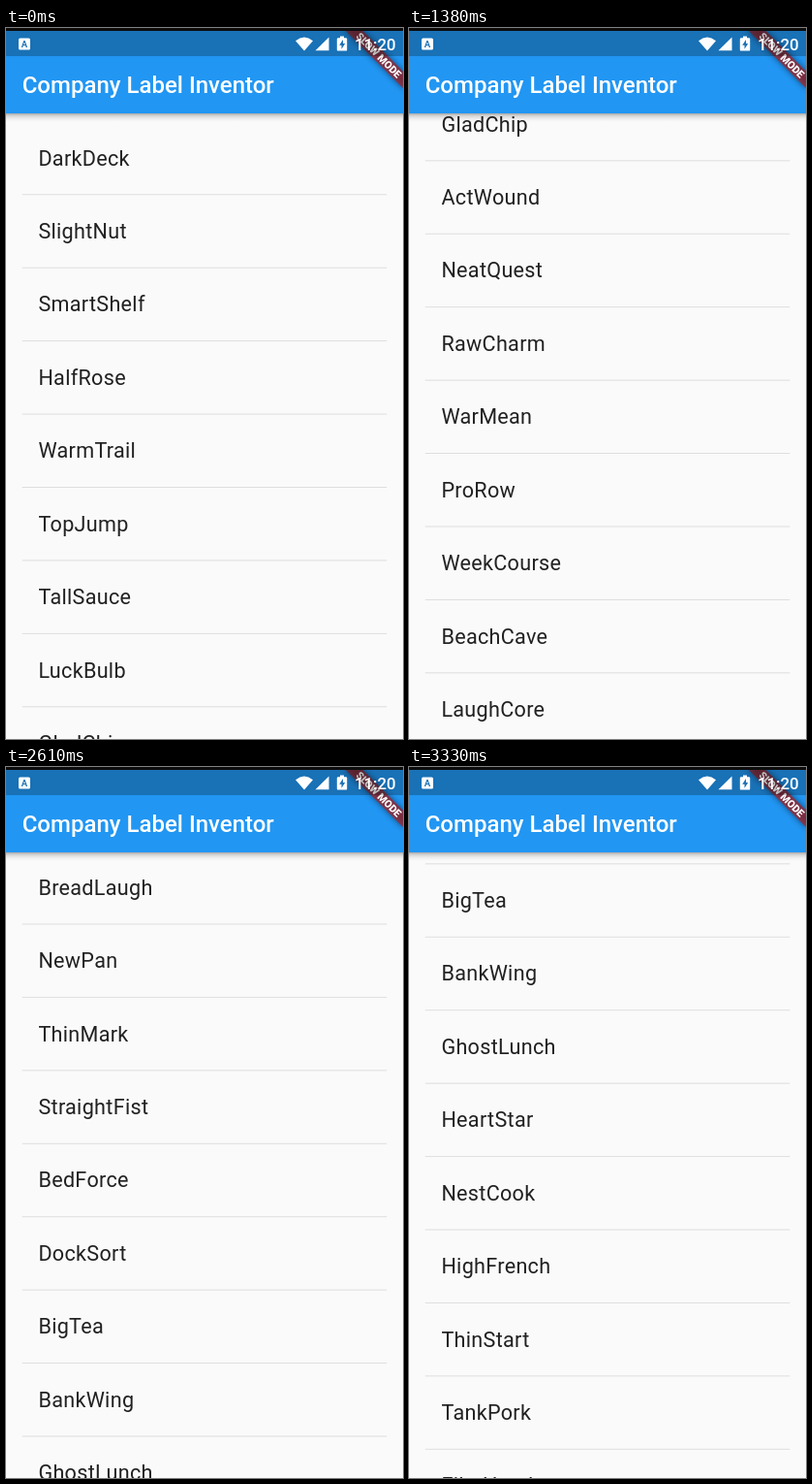
An HTML page for the animation above (4290 ms loop, 410x733 px).

```html
<!DOCTYPE html>
<html lang="en">
<head>
<meta charset="utf-8">
<title>Name list</title>
<style>
  html, body { margin: 0; width: 100%; height: 100%; overflow: hidden; background: #fafafa; }
  svg { display: block; width: 410px; height: 733px; font-family: Roboto, sans-serif; }
  #list text { font-size: 21.6px; letter-spacing: .3px; fill: #000; fill-opacity: .87; }
  #list rect { fill: #000; fill-opacity: .12; }
  .title { font-size: 24px; font-weight: 500; }
  .clock { font-size: 16.8px; font-weight: 500; }
  .ribbon { font-size: 10.66px; font-weight: 900; text-anchor: middle; }
  .badge { font-size: 9.5px; font-weight: 700; text-anchor: middle; }
</style>
</head>
<body>
<svg viewBox="0 0 410 733">
  <defs>
    <linearGradient id="shade" x2="0" y2="1">
      <stop offset="0" stop-opacity=".32"/>
      <stop offset=".3" stop-opacity=".14"/>
      <stop offset=".65" stop-opacity=".04"/>
      <stop offset="1" stop-opacity="0"/>
    </linearGradient>
    <filter id="glow" x="-20%" y="-80%" width="140%" height="260%">
      <feGaussianBlur stdDeviation="3"/>
    </filter>
    <clipPath id="screen"><rect y="3" width="410" height="730"/></clipPath>
  </defs>

  <rect width="410" height="733" fill="#fafafa"/>
  <g id="list"></g>

  <rect y="88" width="410" height="9" fill="url(#shade)"/>
  <rect width="410" height="88" fill="#2196f3"/>
  <text class="title" x="16.7" y="67.2" fill="#fff">Company Label Inventor</text>

  <g clip-path="url(#screen)">
    <g transform="translate(410 3) rotate(45)">
      <rect x="-42" y="29.3" width="84" height="12.5" fill-opacity=".5" filter="url(#glow)"/>
      <rect x="-42" y="29.3" width="84" height="12.5" fill="#b71c1c" fill-opacity=".63"/>
      <text class="ribbon" y="39.3" fill="#fff">SLOW MODE</text>
    </g>
  </g>

  <rect y="3" width="410" height="26" fill-opacity=".25"/>
  <rect width="410" height="3" fill="#0c0c0c"/>

  <g fill="#fff">
    <rect x="13" y="10.5" width="12" height="12" rx="1.5"/>
    <path d="M299 13.2Q308 6 317 13.2L308 23.6Z"/>
    <path d="M333.5 9.5V23.2H319.5Z"/>
    <path d="M345 8.5h4v1.7h2q1.2 0 1.2 1.2v11q0 1.2-1.2 1.2h-8q-1.2 0-1.2-1.2v-11q0-1.2 1.2-1.2h2z"/>
    <text class="clock" x="360" y="23">11:20</text>
  </g>
  <g fill="#1971b6">
    <text class="badge" x="19" y="20">A</text>
    <path d="M348 12L344.2 17.8H346.5V21.8L350.2 16H348Z"/>
  </g>
</svg>
<script>
  const names = `DarkDeck SlightNut SmartShelf HalfRose WarmTrail TopJump TallSauce LuckBulb
    GladChip ActWound NeatQuest RawCharm WarMean ProRow WeekCourse BeachCave LaughCore
    DriedSword DropNet TruthMove BoldLight GreatScript SharpHat CoolBench LongPath SoftGrain
    MainCloud WildStep PlainDish FirmGate CalmRoad BreadLaugh NewPan ThinMark StraightFist
    BedForce DockSort BigTea BankWing GhostLunch HeartStar NestCook HighFrench ThinStart
    TankPork FilmHand`.split(/\s+/);

  const LOOP = 4290, TICK = 30, PITCH = 75.43;
  const list = document.getElementById('list');

  function add(tag, attrs, text = '') {
    const el = document.createElementNS('http://www.w3.org/2000/svg', tag);
    for (const key in attrs) el.setAttribute(key, attrs[key]);
    el.textContent = text;
    list.append(el);
  }

  names.forEach((name, i) => {
    add('text', { x: 33.4, y: 141.5 + i * PITCH }, name);
    add('rect', { x: 16.7, y: 171.3 + i * PITCH, width: 376.6, height: .95 });
  });

  // Decelerating fling between two scroll offsets.
  const fling = (t, start, stop, from, to) =>
    to - (to - from) * Math.pow(Math.max(0, (stop - t) / (stop - start)), 2.8);

  function scrollAt(time) {
    const t = Math.floor(time / TICK) * TICK;
    if (t < 840) return 0;
    if (t < 900) return 43;
    if (t < 1380) return fling(Math.min(t, 1320), 840, 1415, 43, 638.4);
    if (t < 2160) return 638.4;
    return fling(t, 2160, 3340, 1102, 2787.4);
  }

  const begin = performance.now();
  function draw() {
    const t = (performance.now() - begin) % LOOP;
    list.setAttribute('transform', `translate(0 ${-scrollAt(t)})`);
    requestAnimationFrame(draw);
  }
  draw();
</script>
</body>
</html>
```
